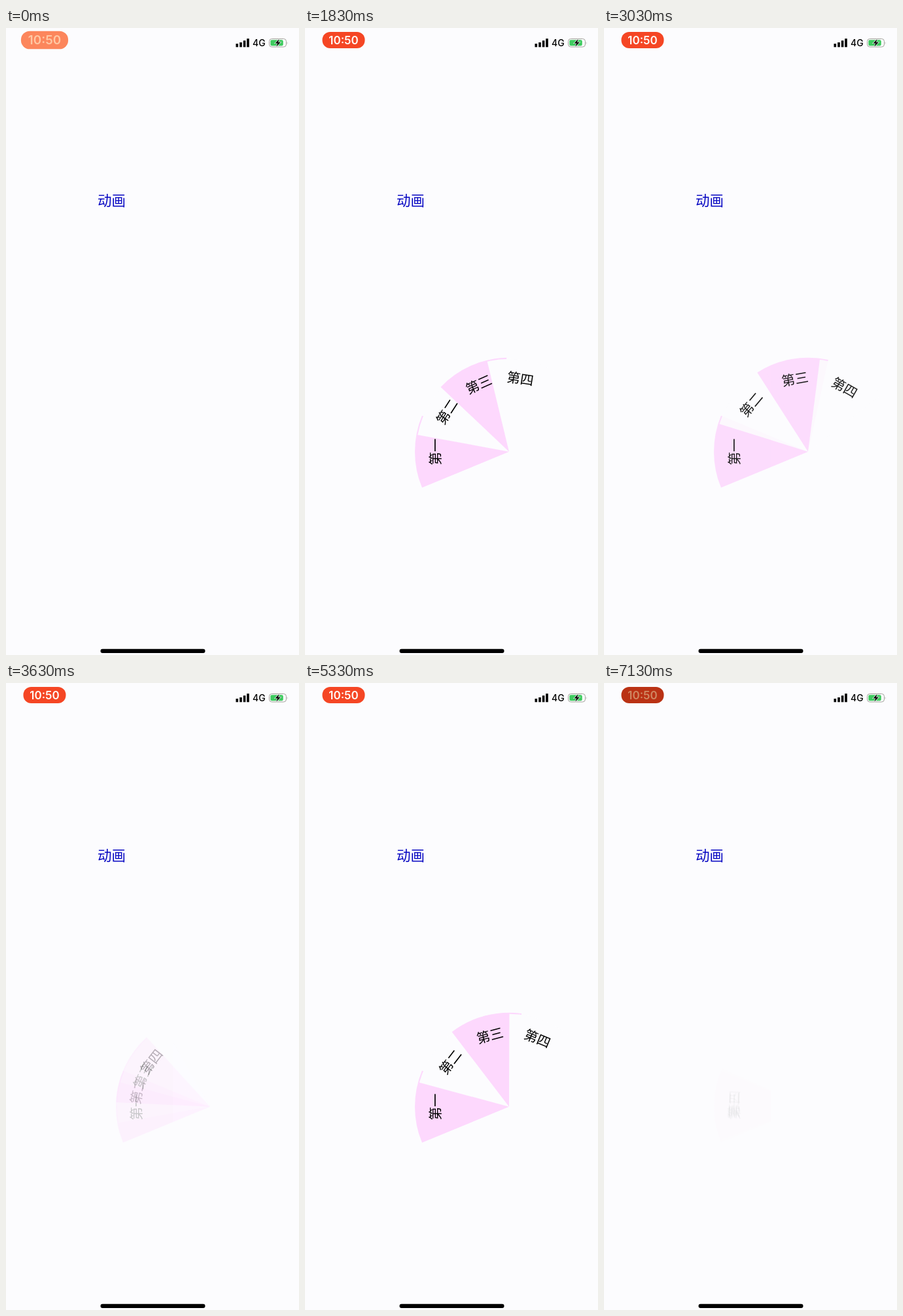
Write an HTML page that moves like this. It is 448 px wide and 960 px high and loops after 7.16 s.

```html
<!DOCTYPE html>
<html lang="zh">
<head>
<meta charset="utf-8">
<style>
  html, body { margin: 0; width: 100%; height: 100%; overflow: hidden; background: #fcfcfe; }
  svg { display: block; width: 448px; height: 960px; }
  text { font-family: Inter, "Noto Sans CJK SC", "Noto Sans CJK", sans-serif; }
  .cjk { font-family: "Noto Sans CJK SC", "Noto Sans CJK", sans-serif; }
</style>
</head>
<body>
<svg viewBox="0 0 448 960">
  <g id="pill">
    <rect x="-32.5" y="-12.5" width="65" height="25" rx="12"/>
    <text y="6" font-size="17" font-weight="600" text-anchor="middle">10:50</text>
  </g>
  <path d="M351.5 24h3.6v5.3h-3.6zM357.2 22h3.6v7.3h-3.6zM362.8 19.2h3.6v10.1h-3.6zM368.2 16.2h3.6v13.1h-3.6z"/>
  <text x="377" y="28" font-size="14" font-weight="450">4G</text>
  <rect x="402.5" y="16.5" width="26" height="12.5" rx="4" fill="none" stroke="#a3a39c"/>
  <rect x="404.3" y="18.3" width="19.5" height="9" rx="2.2" fill="#3ecb5f"/>
  <path d="M429.8 21q1.6 1.8 0 4z" fill="#a3a39c"/>
  <path d="M417.5 17l-6 6.4h3.6l-1.8 5.4 6.7-7h-3.8z" stroke="#fcfcfe" stroke-width="1.2" paint-order="stroke"/>
  <text class="cjk" x="161.5" y="272" font-size="21.5" text-anchor="middle" fill="#0606c2">动画</text>
  <g id="fan" transform="translate(312 648.7)"></g>
  <rect x="144.5" y="950.7" width="160" height="6.3" rx="3"/>
</svg>
<script>
const LOOP = 7160, TURN = 1500, FADE_IN = 900, STEP = 45;
const TAPS = [868, 2680, 4254, 5776]; // open, close, open, close
const fan = document.getElementById('fan');
const pill = document.getElementById('pill');
const [pillBox, pillText] = pill.children;

// One 45° sector pointing left, with its label
function sector(radius, color, label) {
  const x = -radius * Math.cos(Math.PI / 8), y = radius * Math.sin(Math.PI / 8);
  return `<g><path d="M0 0L${x} ${y}A${radius} ${radius} 0 0 1 ${x} ${-y}Z" fill="${color}"/>
    <text class="cjk" transform="translate(-113 0.3) rotate(-90)" y="7.6" font-size="20.5"
      text-anchor="middle">第${label}</text></g>`;
}

fan.innerHTML = [...'一二三四'].map((label, i) =>
  i % 2 ? sector(142, '#fcfcfe', label) : sector(144, '#fdd8fd', label)).join('');

const clamp = v => Math.min(1, Math.max(0, v));

// Cubic ease-in-out with control points (.42, 0) and (.58, 1)
function ease(p) {
  p = clamp(p);
  let lo = 0, hi = 1;
  for (let i = 0; i < 20; i++) {
    const u = (lo + hi) / 2, v = 1 - u;
    if (1.26 * u * v * v + 1.74 * u * u * v + u ** 3 < p) lo = u; else hi = u;
  }
  return lo * lo * (3 - 2 * lo);
}

const mix = (a, b, k) => `rgb(${a.map((v, i) => Math.round(v + (b[i] - v) * k))})`;

function drawPill(t) {
  const settle = ease(t / 330), press = clamp((t - 6990) / 140);
  pill.setAttribute('transform', `translate(59 18.5) scale(${1.11 - 0.11 * settle})`);
  const shade = (start, rest, pressed) =>
    press ? mix(rest, pressed, press) : mix(start, rest, settle);
  pillBox.setAttribute('fill', shade([252, 134, 92], [245, 70, 36], [186, 50, 20]));
  pillText.setAttribute('fill', shade([255, 200, 164], [255, 250, 246], [208, 136, 98]));
}

function drawFan(t) {
  const last = TAPS.findLastIndex(tap => tap <= t);
  const since = t - TAPS[last];
  let open = 0, alpha = 0;
  if (last >= 0) {
    const closing = last % 2;
    open = ease(since / TURN);
    if (closing) open = 1 - open;
    alpha = closing ? open : ease(since / FADE_IN);
  }
  [...fan.children].forEach((g, i) => {
    g.setAttribute('transform', `rotate(${i * STEP * open})`);
    g.setAttribute('opacity', alpha);
  });
}

const start = performance.now();
function frame() {
  const t = (performance.now() - start) % LOOP;
  drawPill(t);
  drawFan(t);
  requestAnimationFrame(frame);
}
frame();
</script>
</body>
</html>
```
